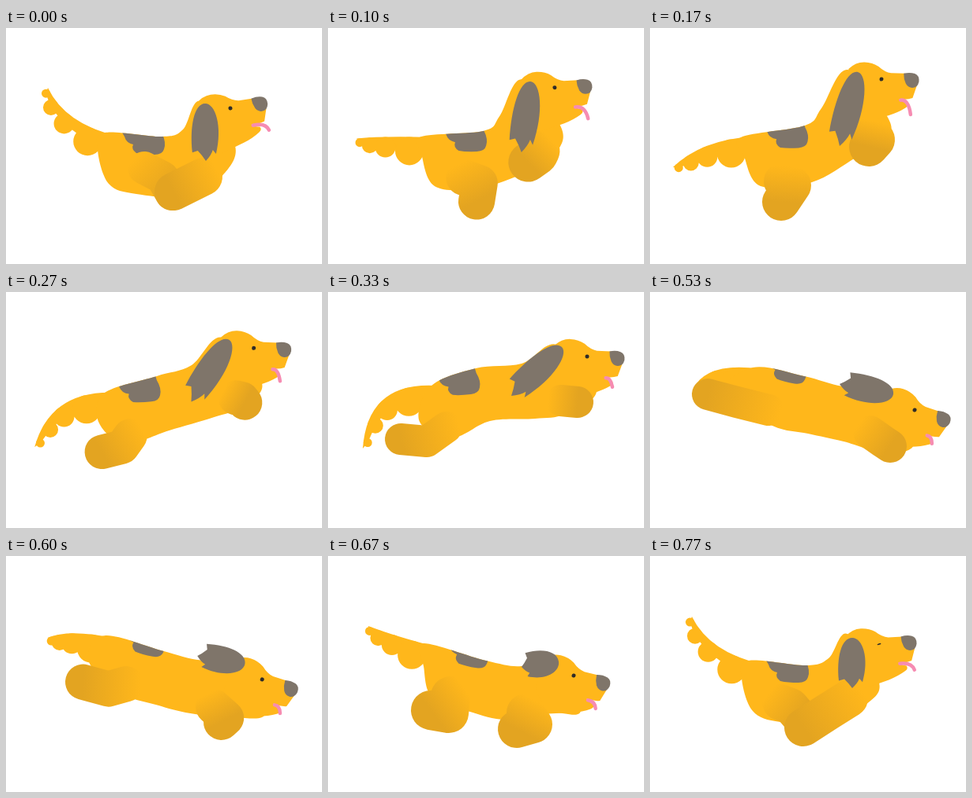
Recreate the animation shown at these times as an HTML page with a canvas. Size 400x300 px, loop 810 ms.

```html
<!DOCTYPE html>
<html lang="en">
<head>
<meta charset="utf-8">
<title>Running dog</title>
<style>
  html, body { margin: 0; width: 100%; height: 100%; overflow: hidden; background: #fff; }
  canvas { display: block; }
</style>
</head>
<body>
<canvas id="stage" width="400" height="300"></canvas>
<script>
const ctx = document.getElementById('stage').getContext('2d');
const GOLD = '#ffb71b', SHADE = '#e3a421', GREY = '#7f756a', PINK = '#f68cb2', DARK = '#2f2c28';
const LOOP = 810, STEPS = 24;

// Steps at which the key poses below are reached
const KEYS = [0, 5, 10, 13, 16, 20, 23];

// Outline: tail base, back, withers, nape, throat, chest, belly front, belly rear, rump, flank
const BODY = [
  [125,133, 198,138, 224,129, 246,93, 290,150, 272,190, 235,215, 165,211, 130,198, 116,155],
  [115,139, 196,124, 217,102, 250,53, 300,112, 300,140, 260,165, 205,196, 140,201, 119,163],
  [130,120, 187,97, 245,91, 290,67, 340,124, 300,155, 262,161, 205,164, 158,185, 116,165],
  [130,107, 190,95, 240,96, 300,87, 350,148, 320,169, 258,171, 208,163, 160,173, 112,148],
  [130,96, 195,107, 245,120, 303,122, 335,190, 300,205, 245,190, 200,180, 155,170, 90,130],
  [120,111, 200,133, 245,140, 283,126, 320,196, 280,199, 225,208, 180,198, 132,180, 121,140],
  [125,133, 198,139, 226,130, 250,99, 290,161, 272,190, 235,212, 165,211, 130,197, 116,155]
];

// Eye position, head angle in degrees, tongue tip in head space
const HEAD = [
  [284,102, -9, 44,36], [293,65, 1.5, 38,45], [328,82, 3, 34,38], [339,107, 8, 37,34],
  [335,150, 18, 34,35], [311,152, 14, 37,35], [290,112, -3, 43,36]
];

// Root and tip
const EAR = [
  [252,96, 253,169], [263,56, 240,150], [296,70, 232,132], [309,89, 233,118],
  [308,130, 240,117], [292,134, 245,141], [256,104, 256,168]
];

// Base, control, tip
const TAIL = [
  [140,137, 75,122, 53,76], [130,138, 65,142, 29,177], [135,119, 50,115, 44,199],
  [145,106, 50,105, 52,178], [140,98, 70,88, 54,125], [135,115, 85,102, 51,89],
  [140,137, 75,122, 53,77]
];

// Hip, knee, paw, radius
const HIND = [
  [175,178, 198,190, 210,211, 21], [168,195, 180,200, 166,221, 24], [150,172, 125,190, 92,187, 20],
  [148,160, 110,163, 67,160, 20], [150,150, 110,140, 73,130, 20], [155,178, 153,200, 130,196, 25],
  [165,186, 178,191, 190,205, 23]
];
const FORE = [
  [250,189, 232,198, 212,208, 24], [280,138, 285,142, 277,151, 25], [295,138, 305,139, 316,140, 20],
  [295,152, 315,152, 333,152, 19], [278,178, 295,190, 304,196, 21], [250,199, 260,214, 239,220, 24],
  [252,181, 225,198, 194,218, 24]
];

// Bottom centre and angle of the saddle patch
const PATCH = [
  [180,161, 0], [180,153, -4], [173,131, -7], [170,120, 0], [175,115, 10], [180,141, 9], [180,161, 0]
];

// Smooth cyclic interpolation through the key poses
function pose(table, n) {
  const size = KEYS.length;
  const time = i => KEYS[(i + size) % size] + STEPS * Math.floor(i / size);
  const at = i => table[(i + size) % size];
  let i = size - 1;
  while (KEYS[i] > n) i--;
  const t1 = time(i), t2 = time(i + 1), span = t2 - t1, u = (n - t1) / span;
  return at(i).map((a, k) => {
    const b = at(i + 1)[k];
    const ma = (b - at(i - 1)[k]) / (t2 - time(i - 1)) * span;
    const mb = (at(i + 2)[k] - a) / (time(i + 2) - t1) * span;
    return a + u * (ma + u * (3 * (b - a) - 2 * ma - mb + u * (2 * (a - b) + ma + mb)));
  });
}

// Closed spline through a flat list of points
function blob(p) {
  const path = new Path2D(), size = p.length;
  const at = i => p[(i + size) % size];
  path.moveTo(p[0], p[1]);
  for (let i = 0; i < size; i += 2) {
    const c = k => [at(i + k) + (at(i + 2 + k) - at(i - 2 + k)) / 6,
                    at(i + 2 + k) - (at(i + 4 + k) - at(i + k)) / 6, at(i + 2 + k)];
    const x = c(0), y = c(1);
    path.bezierCurveTo(x[0], y[0], x[1], y[1], x[2], y[2]);
  }
  path.closePath();
  return path;
}

function fill(color, path) {
  ctx.fillStyle = color;
  ctx.fill(path);
}

function placed(x, y, deg, draw) {
  ctx.save();
  ctx.translate(x, y);
  ctx.rotate(deg * Math.PI / 180);
  draw();
  ctx.restore();
}

function drawTail([bx, by, cx, cy, tx, ty]) {
  const shape = new Path2D(), tufts = new Path2D();
  shape.moveTo(bx, by);
  shape.quadraticCurveTo(cx, cy, tx, ty);
  for (const [t, r] of [[.95, 5.5], [.78, 10], [.55, 13], [.25, 18]]) {
    const s = 1 - t;
    const dx = s * (cx - bx) + t * (tx - cx), dy = s * (cy - by) + t * (ty - cy);
    const len = Math.hypot(dx, dy);
    const x = s * s * bx + 2 * s * t * cx + t * t * tx + dy / len * r;
    const y = s * s * by + 2 * s * t * cy + t * t * ty - dx / len * r;
    shape.lineTo(x, y);
    tufts.moveTo(x + r, y);
    tufts.arc(x, y, r, 0, 7);
  }
  shape.lineTo(bx, by + 18);
  shape.closePath();
  fill(GOLD, shape);
  fill(GOLD, tufts);
}

function drawLeg([hx, hy, kx, ky, px, py, r]) {
  const len = Math.hypot(px - hx, py - hy) || 1;
  const g = ctx.createLinearGradient(hx - (px - hx) / len * r * .8, hy - (py - hy) / len * r * .8, px, py);
  g.addColorStop(0, GOLD);
  g.addColorStop(1, SHADE);
  ctx.strokeStyle = g;
  ctx.lineWidth = 2 * r;
  ctx.lineCap = ctx.lineJoin = 'round';
  ctx.beginPath();
  ctx.moveTo(hx, hy);
  ctx.lineTo(kx, ky);
  ctx.lineTo(px, py);
  ctx.stroke();
}

function drawEar([rx, ry, tx, ty]) {
  const ax = tx - rx, ay = ty - ry, len = Math.hypot(ax, ay);
  const at = (u, v) => [rx + ax * u + ay / len * v, ry + ay * u - ax / len * v];
  const ear = new Path2D();
  ear.moveTo(...at(.85, -17));
  ear.bezierCurveTo(...at(.4, -20), ...at(0, -14), ...at(0, 0));
  ear.bezierCurveTo(...at(0, 13), ...at(.4, 22), ...at(.88, 13));
  ear.lineTo(...at(.81, 9));
  ear.quadraticCurveTo(...at(.9, 7), ...at(1, 0));
  ear.quadraticCurveTo(...at(.91, -4), ...at(.82, -10));
  ear.closePath();
  fill(GREY, ear);
}

const SKULL = new Path2D('M-42 -12Q-33 -21 -22 -21Q-12 -21 -4 -16Q4 -9 12 -8L30 -8L45 7L40 23Q32 26 23 24.5' +
  'Q28 29 33 29Q36 33 31 36Q22 42 10 46L-20 55L-42 30Z');
const NOSE = new Path2D('M28 -8Q36 -10 42 -8Q48 -6 47.5 2Q46 10 39 10Q34 10 31 5Q28 -1 28 -8Z');
const SADDLE = new Path2D('M-46 -50L-30 -23Q-28 -15 -19 -13Q-22 -7 -15 -2Q-6 0 8 0Q18 0 20 -7Q23 -15 18 -26L14 -50Z');

function draw(n) {
  ctx.clearRect(0, 0, 400, 300);
  const body = blob(pose(BODY, n));
  const [ex, ey, tilt, tx, ty] = pose(HEAD, n);

  drawTail(pose(TAIL, n));
  fill(GOLD, body);
  placed(ex, ey, tilt, () => fill(GOLD, SKULL));

  ctx.save();
  ctx.clip(body);
  placed(...pose(PATCH, n), () => fill(GREY, SADDLE));
  ctx.restore();

  drawLeg(pose(HIND, n));
  drawLeg(pose(FORE, n));

  placed(ex, ey, tilt, () => {
    ctx.strokeStyle = PINK;
    ctx.lineWidth = 4.5;
    ctx.beginPath();
    ctx.moveTo(25, 26);
    ctx.quadraticCurveTo(tx - 3, 25, tx, ty - 1);
    ctx.stroke();
    fill(GREY, NOSE);
    const eye = new Path2D();
    eye.ellipse(0, 0, 2.5, n >= 22 ? .9 : 2.5, n >= 22 ? -.2 : 0, 0, 7);
    fill(DARK, eye);
  });
  drawEar(pose(EAR, n));
}

// Steps start on multiples of 10 ms, about 33 ms apart
function tick() {
  const t = performance.now() % LOOP;
  draw(Math.min(STEPS - 1, Math.floor((t - t % 10 + 4) * 3 / 100)));
  requestAnimationFrame(tick);
}
tick();
</script>
</body>
</html>
```
